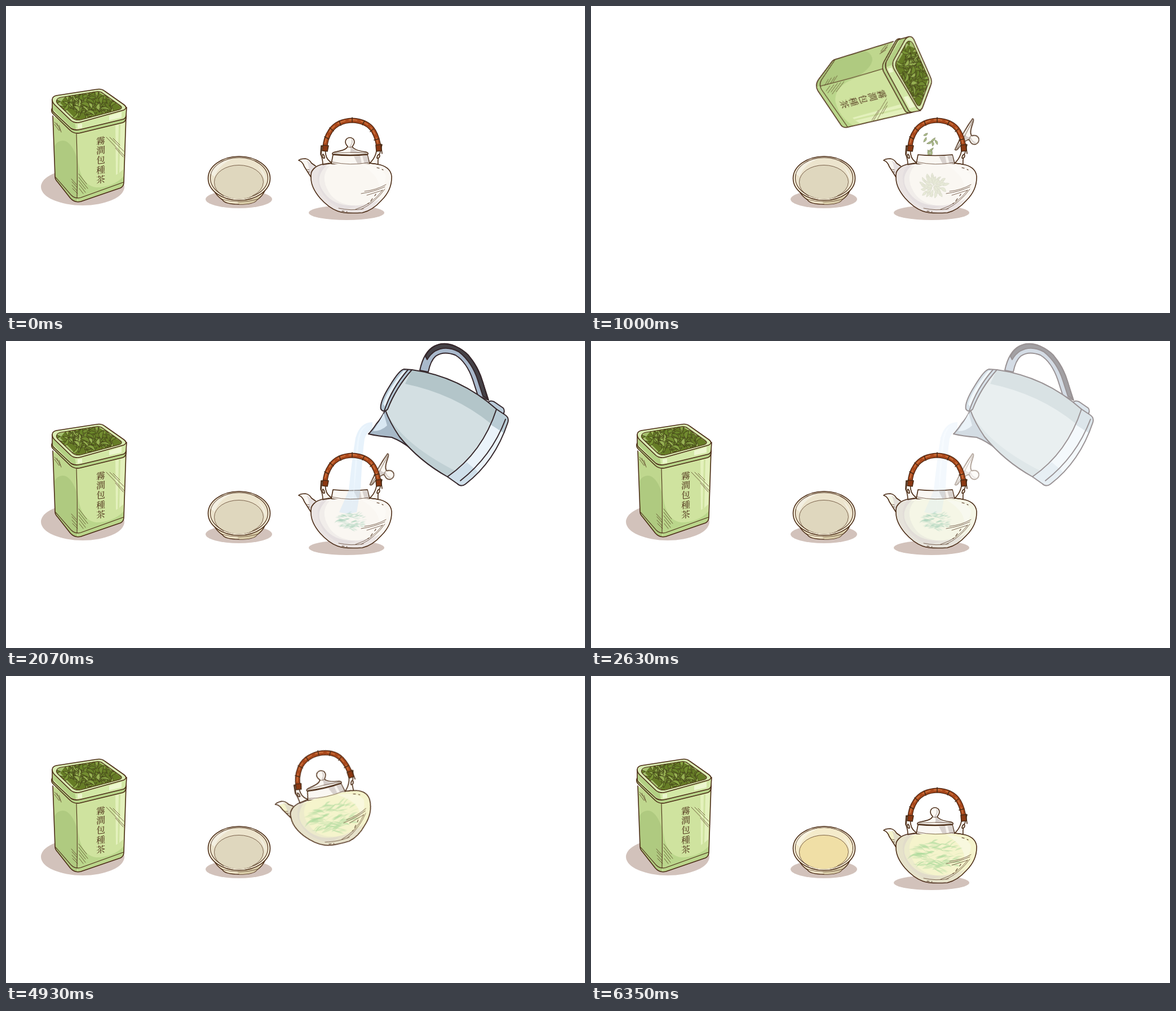
An HTML page that plays this animation: 1027 px wide and 545 px high, repeating every 6.98 s.

```html
<!DOCTYPE html>
<html lang="zh-Hant">
<head>
<meta charset="utf-8">
<title>Brewing tea</title>
<style>
html, body { margin: 0; width: 100%; height: 100%; overflow: hidden; background: #fff; }
svg { display: block; width: 100vw; height: 100vh; }
.ink { stroke: #4b2c16; stroke-width: 1.6; stroke-linejoin: round; stroke-linecap: round; }
.line { fill: none; stroke: #4b2c16; stroke-width: 1.1; stroke-linecap: round; }
.thin { fill: none; stroke: #4b2c16; stroke-width: .7; stroke-linecap: round; }
.steel { stroke: #35272b; stroke-width: 2; stroke-linejoin: round; stroke-linecap: round; }
.shadow { fill: #d2c2bb; }
.label { font: 400 16px "Noto Serif CJK TC", "Noto Sans CJK TC", "Noto Sans CJK", serif; fill: #4b2c16; text-anchor: middle; }
.a { animation: 6980ms step-end infinite; }

.lid-on { animation-name: lidOn; }
.lid-off { animation-name: lidOff; }
.tin-stand { animation-name: tinStand; }
.tin-tilt { animation-name: tinTilt; }
.falling { animation-name: falling; }
.clump { animation-name: clump; }
.brew { animation-name: brew; }
.tint { animation-name: tint; }
.kettle-in { animation-name: kettleIn; }
.kettle-pour { animation-name: kettlePour; }
.stand { animation-name: stand; }
.lifted { animation-name: lifted; }
.tea-stream { animation-name: teaStream; }
.cup-tea { animation-name: cupTea; }

@keyframes lidOn { 0% { opacity: 1 } 5.3% { opacity: 0 } 42.4%, 100% { opacity: 1 } }
@keyframes lidOff {
  0% { opacity: 0 } 5.3% { opacity: 1 }
  35.38% { opacity: 1; animation-timing-function: steps(3, jump-both) }
  39.11%, 100% { opacity: 0 }
}
@keyframes tinStand { 0% { opacity: 1 } 10.6% { opacity: 0 } 20.48%, 100% { opacity: 1 } }
@keyframes tinTilt { 0% { opacity: 0 } 10.6% { opacity: 1 } 20.48%, 100% { opacity: 0 } }
@keyframes falling {
  0% { opacity: 0; transform: translateY(0) }
  12.46% { opacity: 1; transform: translateY(0); animation-timing-function: steps(5) }
  16.61%, 100% { opacity: 0; transform: translateY(125px) }
}
@keyframes clump {
  0% { opacity: 0 }
  13.32% { opacity: 0; animation-timing-function: steps(4) }
  16.61% { opacity: .8 } 24.35% { opacity: .45 } 29.65%, 100% { opacity: 0 }
}
@keyframes brew {
  0% { opacity: 0; transform: scale(.57); fill: #a5d0b8 }
  24.35% { opacity: .4; transform: scale(.57); fill: #a5d0b8 }
  29.65% { opacity: 1; transform: scale(.57); fill: #a5d0b8 }
  39.11% { opacity: 1; transform: scale(.57); fill: #b2dca0 }
  43.83% { opacity: 1; transform: scale(.79); fill: #b2dca0 }
  52%, 100% { opacity: 1; transform: scale(1); fill: #b2dca0 }
}
@keyframes tint {
  0% { fill: #f1f5dc00 }
  35.38% { fill: #f1f5dc00; animation-timing-function: steps(3, jump-both) }
  39.11% { fill: #f1f5dc }
  57.3% { fill: #f1f5dc; animation-timing-function: steps(1, jump-both) }
  59.16%, 100% { fill: #f5f4cc }
}
@keyframes kettleIn { 0% { opacity: 0 } 21.91% { opacity: 1 } 24.35%, 100% { opacity: 0 } }
@keyframes kettlePour {
  0% { opacity: 0 } 24.35% { opacity: 1 }
  35.38% { opacity: 1; animation-timing-function: steps(3, jump-both) }
  39.11%, 100% { opacity: 0 }
}
@keyframes stand {
  0% { opacity: 1 } 70.62% { opacity: 0 }
  85.81% { opacity: 0; animation-timing-function: steps(12, jump-both) }
  90.97%, 100% { opacity: 1 }
}
@keyframes lifted {
  0% { opacity: 0; transform: translate(564px, 184.5px) rotate(-13deg) translate(-613px, -251px) }
  70.62% { opacity: 1; transform: translate(564px, 184.5px) rotate(-13deg) translate(-613px, -251px) }
  81.08% { opacity: 1; transform: translate(480px, 130px) rotate(-35deg) translate(-613px, -251px) }
  85.81% { opacity: 1; transform: translate(480px, 130px) rotate(-35deg) translate(-613px, -251px); animation-timing-function: steps(12, jump-both) }
  90.97%, 100% { opacity: 0; transform: translate(480px, 130px) rotate(-35deg) translate(-613px, -251px) }
}
@keyframes teaStream {
  0% { opacity: 0 } 81.08% { opacity: 1 }
  85.81% { opacity: 1; animation-timing-function: steps(12, jump-both) }
  90.97%, 100% { opacity: 0 }
}
@keyframes cupTea {
  0% { opacity: 0 }
  85.81% { opacity: 0; animation-timing-function: steps(12, jump-both) }
  90.97%, 100% { opacity: 1 }
}
</style>
</head>
<body>
<svg viewBox="0 0 1027 545" preserveAspectRatio="none">
<defs>
  <clipPath id="mouth"><path d="M90 167Q91 163 98 162L160 152Q167 151 172 155L203 177Q208 181 201 184L133 202Q124 204 118 199L92 174Q88 170 90 167Z"/></clipPath>
  <clipPath id="belly"><path d="M557 281Q541 287 541 301Q540 321 557 341Q572 358 588 364Q600 369 632 367Q650 363 666 345Q685 326 684 302Q682 287 664 282Q610 276 557 281Z"/></clipPath>

  <g id="tin">
    <path fill="#cfe39f" d="M83 195L87 303Q87 308 92 313L114 341Q122 350 133 347L203 323Q209 320 209 313L213 195L124 215Z"/>
    <path fill="#bfd78e" d="M83 197L87 305L92 313L114 341Q119 347 126 347L125 222Z"/>
    <path fill="#afca80" d="M85 250Q93 236 106 240Q118 246 125 268L126 347Q119 347 114 341L92 313L87 305Z"/>
    <path fill="#bad68b" d="M127 256Q127 318 160 322Q190 322 209 302L209 313Q209 320 203 323L133 347L127 347Z"/>
    <path fill="#e4f1bd" d="M194 212L211 207L208 290Q202 296 195 300Z"/>
    <path fill="#cfe39f" d="M200 211L203 210L201 296L198 298Z"/>
    <path class="ink" fill="none" d="M83 195L87 303Q87 308 92 313L114 341Q122 350 133 347L203 323Q209 320 209 313L213 195"/>
    <path class="line" d="M125 227Q127 285 126 341M88 304L116 336Q123 343 133 340L208 313"/>
    <path class="thin" d="M116 307l9 10M117 312l9 10M117 318l9 10M118 324l9 9M129 298l14 18M129 304l16 20M129 310l12 15M130 317l11 14M130 324l7 9M86 206l6 7M86 210l8 11M90 208l6 13M94 212l4 12M178 233l32 33M184 233l25 25M190 235l12 12M194 252l14 16"/>
    <path class="ink" fill="#b7d388" d="M82 181Q79 186 83 191L114 221Q122 228 133 225L207 207Q213 205 213 197L213 191L124 215Z"/>
    <path class="ink" fill="#d2e7a5" d="M82 166L82 182Q82 187 86 190L115 217Q122 222 133 219L208 201Q213 199 213 194L214 180L124 207Z"/>
    <path fill="#b3d083" d="M83 172L83 183L115 215Q119 218 124 219L122 206Z"/>
    <path fill="#edf6cf" d="M183 195L205 188L205 198L183 203ZM127 210l8-1v7l-8 1z"/>
    <path class="ink" fill="#d9ecb2" d="M82 166Q82 161 89 159L160 148Q169 146 175 151L209 175Q217 181 208 185L133 206Q122 209 115 203L86 175Q82 171 82 166Z"/>
    <g clip-path="url(#mouth)">
      <path fill="#a5c06d" d="M80 140H220V210H80Z"/>
      <path fill="#667c26" d="M96 172L108 157L160 151L205 179L200 186L126 203Z"/>
      <g id="tinLeaves" stroke="#45461a" stroke-width=".9"/>
    </g>
    <path class="line" d="M90 167Q91 163 98 162L160 152Q167 151 172 155L203 177Q208 181 201 184L133 202Q124 204 118 199L92 174Q88 170 90 167Z"/>
    <text class="label" transform="translate(168 278) skewY(-8)"><tspan x="0" y="-33">霧</tspan><tspan x="0" y="-16">澗</tspan><tspan x="0" y="1">包</tspan><tspan x="0" y="19">種</tspan><tspan x="0" y="36">茶</tspan></text>
  </g>

  <g id="lid">
    <path class="ink" stroke-width="1.2" fill="#fbf8f3" d="M579 263Q578 260 584 259Q602 256 605 251Q607 249 604 247Q600 241 604 236Q610 231 616 236Q620 241 616 247Q613 250 616 252Q622 257 638 259Q643 260 642 263Q610 266 579 263Z"/>
    <path fill="#d5cdc9" d="M612 235Q618 239 613 247Q612 251 616 254Q623 259 638 261L610 261Q613 254 609 249Q615 243 612 235Z"/>
    <path class="thin" d="M581 261Q610 259 640 261M605 250Q610 252 615 250"/>
  </g>

  <path id="bellyShape" d="M519 274Q522 271 531 271Q538 272 542 279L553 284Q610 276 664 282Q682 287 684 302Q685 326 666 345Q650 363 632 367Q600 369 588 364Q572 358 557 341Q540 321 540 304L529 285Q526 276 519 274Z"/>
  <path id="waterShape" d="M525 277L537 275L549 285Q610 276 664 282Q682 287 684 302Q685 326 666 345Q650 363 632 366Q600 368 588 363Q572 358 557 341Q540 321 540 304L531 287Z"/>

  <g id="potBase">
    <path class="ink" stroke-width="1.2" fill="#faf7f2" d="M559 248L558 263Q562 272 562 282L579 279Q569 274 567 263L566 252ZM667 246L663 262Q659 270 660 281L645 279Q653 272 656 262L659 250Z"/>
    <path class="ink" fill="#faf7f2" d="M580 264L577 280Q610 286 645 280L641 264Q610 267 580 264Z"/>
    <path fill="#d9d2ce" d="M617 267L641 265L644 279L624 281Z"/>
    <path fill="#f7f3ee" d="M628 266h4l4 14h-5z"/>
    <use href="#bellyShape" fill="#faf7f2"/>
  </g>

  <g id="potInk">
    <g clip-path="url(#belly)">
      <path fill="#c9bfc6" opacity=".34" d="M540 280H572Q545 303 562 328Q576 351 606 354Q640 356 664 343L640 370H585L540 330Z"/>
      <path fill="#c9bfc6" opacity=".18" d="M574 284Q556 303 573 331Q586 352 620 355L600 362Q566 350 556 322Q548 300 560 285Z"/>
      <path fill="#fff" opacity=".35" d="M630 282Q668 284 674 302Q673 318 661 331Q668 304 630 282Z"/>
    </g>
    <path fill="#c9bfc6" opacity=".4" d="M533 274L551 285Q541 294 541 305L535 294Q540 288 533 274Z"/>
    <path class="ink" fill="none" d="M577 279Q556 280 548 287Q540 293 541 303Q540 321 557 341Q572 358 588 364Q600 369 632 367Q650 363 666 345Q685 326 684 302Q682 287 664 282Q655 280 645 279M549 284L542 279Q538 272 531 271Q522 271 519 274Q526 276 529 285L541 304"/>
    <path class="thin" d="M579 277Q610 284 643 278M630 333Q652 330 672 321M636 329Q656 327 674 317M640 336L668 327M620 361Q650 352 668 327M630 361Q656 348 672 325M536 294l3 1M534 290l4 1M590 359Q612 364 634 360"/>
    <path class="line" stroke-width="2.4" d="M656 334l-2 3M650 342l-3 4M643 350l-1 1M658 287l4 1M667 290l2 1M596 364l4 .5M604 365h1"/>
  </g>

  <g id="handle" fill="none" stroke-linecap="round">
    <path id="bow" stroke="#4b2410" stroke-width="9" d="M566 252Q566 236 576 221Q588 204 614 203Q641 204 652 222Q660 236 661 252"/>
    <path stroke="#a9481b" stroke-width="6.4" d="M566 252Q566 236 576 221Q588 204 614 203Q641 204 652 222Q660 236 661 252"/>
    <path stroke="#d9824a" stroke-width="1.3" stroke-dasharray="14 7" d="M566 243Q568 233 576 220Q589 203 614 202Q640 203 651 221Q658 233 659 243"/>
    <path class="ink" stroke-width="1.4" d="M565 232l7 4M574 216l7 6M591 204l3 8M614 198v8M636 204l-4 7M652 218l-6 5M661 236l-8 2"/>
    <path class="ink" fill="#8a3812" d="M562 247l10 1-2 10-9-1zM656 247l9-1 1 11-9 1z"/>
    <path class="ink" stroke-width="1.1" fill="#f5ede4" d="M560 248l-1 16M665 245l2 17M562 263q3 2 3 7q-4 1-4-5zM662 263q-4 2-4 7q4 1 5-4z"/>
  </g>

  <g id="kettle">
    <path class="steel" fill="#a7b9c8" d="M672 124Q666 137 657 147Q650 158 643 165Q660 169 684 171Q702 178 718 191L722 160L690 118Z"/>
    <path fill="#d8e7f2" d="M670 128Q664 141 651 160Q666 160 676 150Z"/>
    <path class="steel" fill="#a9b9cc" d="M734 52Q741 19 760 9Q781 -1 804 13Q829 28 842 62L856 105L837 97L828 69Q817 37 797 25Q776 17 762 27Q753 35 749 55Z"/>
    <path class="steel" stroke-width="1.2" fill="#454247" d="M744 27Q752 9 773 5Q800 5 820 25Q838 47 846 74L854 102L846 98L837 70Q827 38 803 19Q780 7 761 18Q753 23 747 33Z"/>
    <path class="steel" fill="#b9cbd9" d="M853 111Q858 104 866 108L882 119Q886 124 881 132L855 123Z"/>
    <path fill="#d3dfe2" d="M720 51Q805 63 870 121Q842 198 783 241Q733 213 698 170Q681 145 673 123Q687 83 720 51Z"/>
    <path fill="#b3c5c9" d="M720 51Q805 63 870 121L859 146Q795 94 708 76Z"/>
    <path fill="#c0d0d4" d="M673 123Q700 181 796 230L783 241Q733 213 698 170Q681 145 673 123Z"/>
    <path fill="#eaf3fa" d="M870 121L885 131Q893 136 890 145Q867 214 815 254Q807 260 800 253L783 241Q845 198 870 121Z"/>
    <path fill="#b9ccd5" d="M870 121L885 131Q893 136 890 145L884 164L859 148Z"/>
    <path fill="#cfdfea" d="M817 215L837 232Q827 244 815 254Q807 260 800 253L783 241Q802 229 817 215Z"/>
    <path class="steel" fill="none" d="M720 51Q805 63 870 121L885 131Q893 136 890 145Q867 214 815 254Q807 260 800 253L783 241Q733 213 698 170Q681 145 673 123"/>
    <path class="steel" fill="none" stroke-width="1.2" d="M870 121Q845 198 783 241M886 139Q861 205 806 248"/>
    <path class="steel" fill="#b4c8d5" d="M665 121Q662 109 681 79Q698 51 706 50L720 51Q691 84 677 121Q670 128 665 121Z"/>
    <path fill="#e6f1f8" d="M669 112Q677 86 705 53L710 53Q686 83 673 117Z"/>
    <path class="steel" fill="none" stroke-width="1.2" d="M713 51Q684 84 671 124"/>
  </g>
</defs>

<g class="a tin-stand">
  <ellipse class="shadow" cx="136" cy="321" rx="74" ry="33"/>
  <use href="#tin"/>
</g>

<ellipse class="shadow" cx="413" cy="343" rx="59" ry="16"/>
<path class="ink" fill="#efe5c9" d="M368 326Q374 338 384 344Q388 352 414 352Q440 352 445 344Q455 338 460 326Z"/>
<path fill="#d6c9a6" d="M410 347Q440 345 455 334L445 344Q440 352 414 352Z"/>
<ellipse class="ink" cx="413.5" cy="306" rx="55" ry="39" fill="#f6efdb"/>
<ellipse class="line" cx="413.5" cy="305.5" rx="51" ry="36.5" style="fill:#ece4cd"/>
<ellipse cx="413" cy="312.5" rx="43.5" ry="30" fill="#dfd7be"/>
<g class="a cup-tea">
  <ellipse cx="413.5" cy="305.5" rx="50.5" ry="36" fill="#f4ebcb"/>
  <ellipse cx="413" cy="312.5" rx="43.5" ry="30" fill="#f0dfa6"/>
</g>
<path fill="#fff" opacity=".4" d="M363 298Q370 275 404 271Q378 280 370 303ZM447 284Q462 296 461 314Q456 297 447 284Z"/>
<path class="thin" d="M386 338Q369 327 369.5 312.5A43.500 30 0 0 1 456.500 312.500Q456 328 437 337M382 343Q414 352 447 343"/>

<g class="a falling" id="falling" fill="#76963a" stroke="#3d4714" stroke-width=".8"></g>
<g class="a lid-off"><use href="#lid" transform="translate(662 228) rotate(119.6) translate(-610.500 -262)"/></g>

<g class="a stand">
  <ellipse class="shadow" cx="604" cy="367" rx="67" ry="13"/>
  <use href="#potBase"/>
  <g class="a tint"><use href="#waterShape"/></g>
  <g class="a clump" id="clump" fill="#9db36f" stroke="#6c7c45" stroke-width=".8"></g>
  <g transform="translate(611 320)"><g class="a brew" id="brew"></g></g>
  <g class="a kettle-pour">
    <path fill="#cfe6f8" opacity=".5" d="M650 144Q628 144 620 172Q613 215 608 265L591 304Q606 308 622 304L629 262Q632 200 636 174Q640 160 650 158Z"/>
    <path fill="#f1f9ff" opacity=".7" d="M641 150Q629 155 626 180L618 262L612 300L617 262Q619 200 624 172Q629 152 641 150Z"/>
  </g>
  <use href="#potInk"/>
  <g class="a lid-on"><use href="#lid"/></g>
  <use href="#handle"/>
</g>

<g class="a kettle-in"><use href="#kettle" transform="rotate(10 780 130)"/></g>
<g class="a kettle-pour"><use href="#kettle"/></g>

<g class="a tin-tilt"><use href="#tin" transform="translate(484 165) rotate(75) translate(-168 -272)"/></g>

<g class="a tea-stream">
  <ellipse cx="416" cy="329" rx="17" ry="10" fill="#f0e3ac"/>
  <path fill="#f4eebd" d="M419 198Q408 200 407 222L405 326Q412 332 420 326L418 222Q418 208 422 204Z"/>
  <path fill="#fdfbe6" d="M412 206L410 322L413 322L414 210Z"/>
</g>
<g class="a lifted">
  <use href="#potBase"/>
  <use href="#waterShape" fill="#f5f4cc"/>
  <g id="brewLifted" fill="#b2dca0" transform="translate(611 320)"></g>
  <use href="#potInk"/>
  <use href="#lid"/>
  <use href="#handle"/>
</g>
</svg>
<script>
let seed = 11;
const rnd = () => (seed = seed * 16807 % 2147483647) / 2147483647;
const range = (a, b) => a + (b - a) * rnd();
const fix = n => n.toFixed(1);

// A pointed leaf along x; unequal bulges give it a curl.
function leaf(x, y, len, deg, up, down, attrs = '') {
  return `<path transform="translate(${fix(x)} ${fix(y)}) rotate(${fix(deg)})" ${attrs}
    d="M0 0Q${fix(len / 2)} ${fix(-up)} ${fix(len)} 0Q${fix(len / 2)} ${fix(down)} 0 0Z"/>`;
}
function fill(id, count, make) {
  let out = '';
  for (let i = 0; i < count; i++) out += make(i);
  document.getElementById(id).innerHTML = out;
}

const greens = ['#6a852a', '#7a9636', '#88a544', '#96b052', '#728c30'];
fill('tinLeaves', 75, i => {
  const u = rnd(), v = rnd();
  const x = 96 + 58 * u + 38 * v, y = 169 - 14 * u + 27 * v;
  return leaf(x, y, range(13, 21), range(0, 360), range(9, 15), range(-5, 1), `fill="${greens[i % 5]}"`);
});

fill('falling', 10, () => leaf(range(592, 612), range(175, 215), range(8, 13), range(20, 160), 5, 2));

fill('clump', 40, i => {
  const angle = i * 137.5, r = 17 * (1 - i / 40), a = angle * Math.PI / 180;
  return leaf(607 + r * Math.cos(a), 319 + r * .8 * Math.sin(a), range(9, 15), angle + range(-35, 35), range(4, 8), range(1, 5));
});

fill('brew', 120, () => {
  const a = range(0, 6.283), r = Math.sqrt(rnd());
  const x = 46 * r * Math.cos(a), y = 27 * r * Math.sin(a);
  const len = range(13, 23), deg = range(-28, 28) + y * x * .03;
  return leaf(x - len / 2, y, len, deg, range(2, 7), range(-2, 3), `opacity="${fix(range(.25, .65))}"`);
});
document.getElementById('brewLifted').innerHTML = document.getElementById('brew').innerHTML;
</script>
</body>
</html>
```
